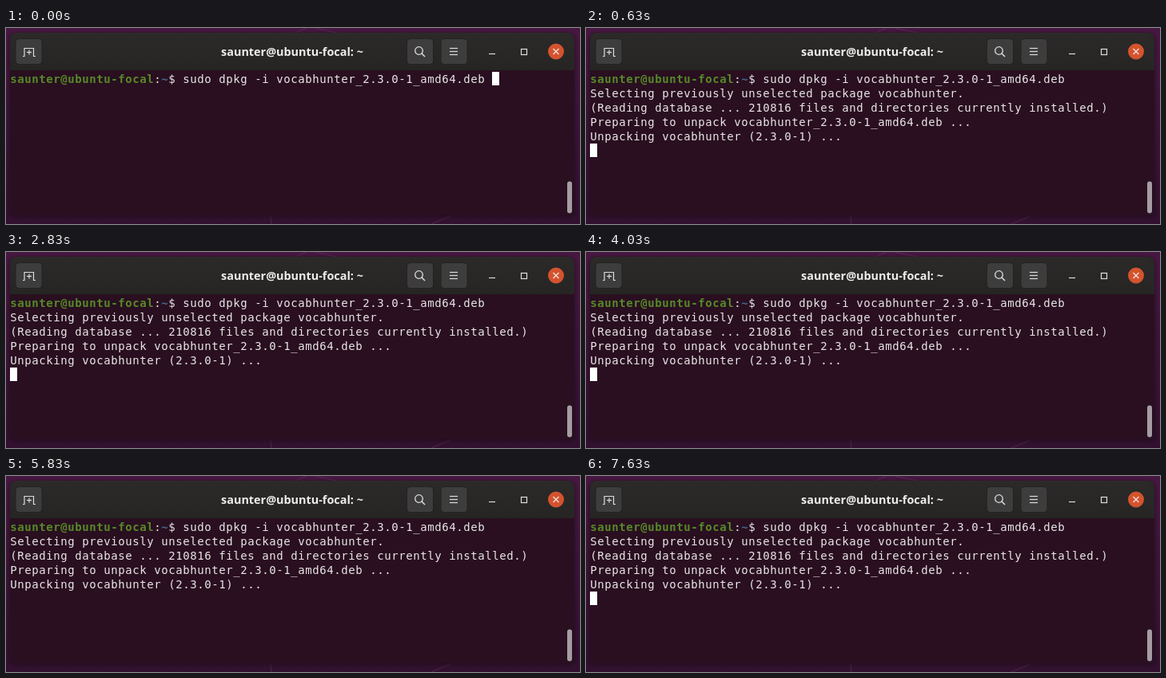
Write an HTML page with a canvas that moves like this. It is 718 by 246 pixels and loops after 8000 ms.

```html
<!DOCTYPE html>
<html lang="en">
<head>
<meta charset="utf-8">
<title>Terminal</title>
<style>
html, body { margin: 0; width: 718px; height: 246px; overflow: hidden; background: #35102f; }
canvas { display: block; }
</style>
</head>
<body>
<canvas id="stage" width="718" height="246"></canvas>
<script>
const ctx = document.getElementById('stage').getContext('2d');
const LOOP = 8000, CELL = 9, ROW = 18, LEFT = 5, TOP = 54;
const MONO = '14px "DejaVu Sans Mono", monospace';
const TEXT = '#e9e5e7', GROUND = '#290f20';
const USER = 'saunter@ubuntu-focal';
const COMMAND = 'sudo dpkg -i vocabhunter_2.3.0-1_amd64.deb';
const OUTPUT = [
  'Selecting previously unselected package vocabhunter.',
  '(Reading database ... 210816 files and directories currently installed.)',
  'Preparing to unpack vocabhunter_2.3.0-1_amd64.deb ...',
  'Unpacking vocabhunter (2.3.0-1) ...'
];

function box(x, y, w, h, r, fill) {
  ctx.beginPath();
  ctx.roundRect(x, y, w, h, r);
  ctx.fillStyle = fill;
  ctx.fill();
}

function line(color, width, ...points) {
  ctx.beginPath();
  points.forEach(([x, y], i) => i ? ctx.lineTo(x, y) : ctx.moveTo(x, y));
  ctx.strokeStyle = color;
  ctx.lineWidth = width;
  ctx.stroke();
}

function gradient(y0, y1, from, to) {
  const g = ctx.createLinearGradient(0, y0, 0, y1);
  g.addColorStop(0, from);
  g.addColorStop(1, to);
  return g;
}

function print(text, col, row, color, bold) {
  ctx.font = (bold ? 'bold ' : '') + MONO;
  ctx.textAlign = 'center';
  ctx.fillStyle = color;
  [...text].forEach((ch, i) =>
    ctx.fillText(ch, LEFT + (col + i + 0.5) * CELL, TOP + row * ROW + 15));
}

function cursor(col, row) {
  box(LEFT + col * CELL, TOP + row * ROW + 1, CELL, ROW - 1, 0, '#ffffff');
}

function wallpaper() {
  box(0, 0, 718, 246, 0, gradient(0, 246, '#471741', '#31102f'));
  const faint = 'rgba(130, 75, 120, 0.35)';
  line(faint, 1, [362, 6], [376, 0]);
  line(faint, 1, [386, 0], [414, 6]);
  line(faint, 1, [331, 236], [332, 246]);
  line(faint, 1, [532, 246], [556, 236]);
}

function windowFrame() {
  ctx.save();
  ctx.shadowColor = 'rgba(15, 4, 14, 0.65)';
  ctx.shadowBlur = 6;
  ctx.shadowOffsetY = 1;
  box(5, 6, 706, 229, [8, 8, 0, 0], GROUND);
  ctx.restore();
  box(5, 6, 706, 47, [8, 8, 0, 0], gradient(6, 53, '#2b2a29', '#262524'));
}

function button(x) {
  box(x, 13, 34, 33, 5, '#242322');
  box(x + 1, 14, 32, 31, 4, '#3d3d3e');
}

function header() {
  const ink = '#deddda';
  button(11.5);
  line(ink, 1.2, [21, 35.5], [23, 35.5], [23, 25.5], [34.5, 25.5], [34.5, 35.5], [37, 35.5]);
  line(ink, 1.2, [26, 30.5], [32, 30.5]);
  line(ink, 1.2, [29, 27.5], [29, 33.5]);

  button(501);
  ctx.beginPath();
  ctx.arc(516.5, 28.5, 4.8, 0, Math.PI * 2);
  ctx.strokeStyle = ink;
  ctx.lineWidth = 1.3;
  ctx.stroke();
  line(ink, 1.6, [520, 32], [524, 36]);

  button(543.5);
  for (const y of [25.5, 29.5, 33.5]) line(ink, 1.2, [555, y], [565, y]);

  line(ink, 1.2, [604, 32.5], [612, 32.5]);
  ctx.strokeRect(644.5, 26.5, 7, 7);
  ctx.beginPath();
  ctx.arc(688, 29.5, 10, 0, Math.PI * 2);
  ctx.fillStyle = '#d4532f';
  ctx.fill();
  line('#f3ddd5', 1.4, [684.5, 26], [691.5, 33]);
  line('#f3ddd5', 1.4, [691.5, 26], [684.5, 33]);

  ctx.font = 'bold 14.4px "Open Sans", "Noto Sans", sans-serif';
  ctx.textAlign = 'center';
  ctx.fillStyle = '#eeedeb';
  ctx.fillText(USER + ': ~', 358, 34.5);
}

function terminal(t) {
  box(702, 192.5, 6, 40, 3, '#a49ca2');
  print(USER, 0, 0, '#568a28', true);
  print(':', 20, 0, TEXT);
  print('~', 21, 0, '#426797', true);
  print('$ ' + COMMAND, 22, 0, TEXT);

  if (t < 500) {
    cursor(67, 0);
    return;
  }
  if (t < 570) {
    print(OUTPUT[0], 0, 1, TEXT);
    cursor(0, 2);
    print('(', 0, 2, GROUND);
    print('Reading database ... 60%', 1, 2, TEXT);
    return;
  }
  const count = t < 630 ? 3 : 4;
  OUTPUT.slice(0, count).forEach((text, i) => print(text, 0, i + 1, TEXT));
  const blink = Math.floor((t - 430) / 600) % 2 === 0;
  if (blink) cursor(0, count + 1);
}

function draw(now) {
  wallpaper();
  windowFrame();
  header();
  terminal(now % LOOP);
  requestAnimationFrame(draw);
}
requestAnimationFrame(draw);
</script>
</body>
</html>
```
